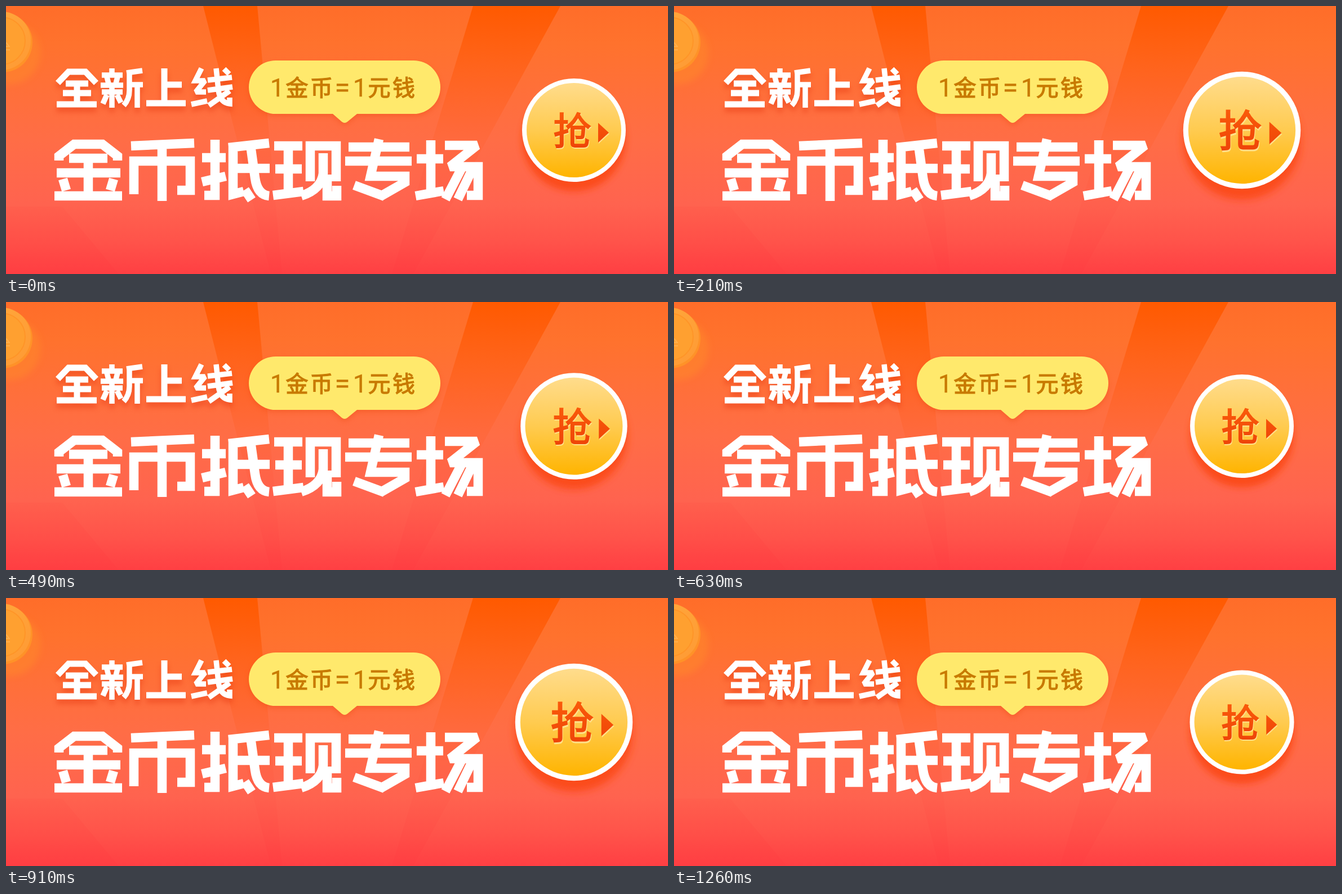
An HTML page that plays this animation: 1175x477 px, repeating every 1.33 s.

```html
<!DOCTYPE html>
<html lang="zh">
<head>
<meta charset="utf-8">
<title>金币抵现专场</title>
<style>
  html, body { margin: 0; width: 100%; height: 100%; overflow: hidden; background: #ff6a40; }
  svg { display: block; width: 100vw; height: 100vh; }
  text { font-family: "Noto Sans CJK SC", "Noto Sans CJK", "Noto Sans CJK JP", sans-serif; }
  .lettering { fill: none; stroke: #fff; stroke-linejoin: miter; stroke-miterlimit: 2; }
  .small { stroke-width: 11; filter: drop-shadow(0 8px 5px rgba(226, 48, 12, .42)); }
  .thin { stroke-width: 9.5; }
  .big { stroke-width: 16.5; }
  .bubble { fill: #ffe96c; filter: drop-shadow(0 4px 4px rgba(236, 70, 10, .35)); }
  .rate { fill: #c87a00; stroke: #c87a00; stroke-width: 1.3; font-size: 40px; }
  .rate .digit { font-family: Roboto, sans-serif; font-size: 44px; font-weight: 400; stroke-width: .4; }
  .label { stroke-width: 2; font-size: 67px; }
  .label path { stroke: none; }
</style>
</head>
<body>
<svg viewBox="0 0 1175 477">
  <defs>
    <linearGradient id="sky" x2="0" y2="1">
      <stop offset="0" stop-color="#ff6d29"/>
      <stop offset=".14" stop-color="#ff722d"/>
      <stop offset=".5" stop-color="#ff6d46"/>
      <stop offset=".74" stop-color="#ff634f"/>
      <stop offset=".88" stop-color="#ff534a"/>
      <stop offset="1" stop-color="#ff3f43"/>
    </linearGradient>
    <linearGradient id="ray" gradientUnits="userSpaceOnUse" x2="0" y2="477">
      <stop offset="0" stop-color="#ff5a00"/>
      <stop offset=".22" stop-color="#ff5a0c" stop-opacity=".6"/>
      <stop offset=".5" stop-color="#ff5a20" stop-opacity=".2"/>
      <stop offset=".75" stop-color="#ff4a40" stop-opacity=".12"/>
      <stop offset="1" stop-color="#ff3a40" stop-opacity=".3"/>
    </linearGradient>
    <linearGradient id="gold" x2="0" y2="1">
      <stop offset="0" stop-color="#ffdc8c"/>
      <stop offset=".5" stop-color="#ffcb50"/>
      <stop offset="1" stop-color="#ffb400"/>
    </linearGradient>
    <linearGradient id="coin" x2="1" y2="1">
      <stop offset="0" stop-color="#ffa93c"/>
      <stop offset="1" stop-color="#ff9a34"/>
    </linearGradient>
    <linearGradient id="ink" gradientUnits="userSpaceOnUse" y1="-32" x2="0" y2="32">
      <stop offset="0" stop-color="#fa5a0a"/>
      <stop offset="1" stop-color="#ee4408"/>
    </linearGradient>
    <filter id="blur" x="-30%" y="-30%" width="160%" height="160%">
      <feGaussianBlur stdDeviation="6"/>
    </filter>
  </defs>

  <rect width="1175" height="477" fill="url(#sky)"/>
  <g fill="url(#ray)">
    <path d="M350 0H446L490 477H470Z"/>
    <path d="M829 0H984L723 477H685Z"/>
    <path d="M100 357L200 477H0V357Z"/>
  </g>

  <circle cx="6" cy="84" r="55" fill="#ff8a2c" opacity=".5" filter="url(#blur)"/>
  <circle cx="-6" cy="65" r="53" fill="#ff9228"/>
  <circle cx="-8" cy="62" r="52" fill="url(#coin)"/>
  <circle cx="-8" cy="62" r="42" fill="#ffa030" stroke="#ff9528" stroke-width="2"/>
  <path d="M0 65L5 71M0 72H7M0 78H7" fill="none" stroke="#ffb04c" stroke-width="2"/>

  <g class="lettering small" role="img" aria-label="全新上线">
    <path d="M92 137L111 117H141L160 137M106 138H146M101 155H151M90 175H161M126 138V175"/>
    <path class="thin" d="M188 111V122M170 123H207M179 126L182 138M198 126L195 138M168 141H208M170 153H207M188 141V181M179 158L172 174M197 158L204 172M242 115L214 119M219 117V150Q219 166 209 177M219 140H243M233 140V181"/>
    <path d="M281 111V174M281 140H312M249 173H319"/>
    <path class="thin" d="M347 111L336 133H353L337 153H355M329 175L357 169M358 132L401 127M358 150L402 144M373 111L377 150Q380 172 397 174V163M397 151L360 177M387 112L396 121"/>
  </g>

  <g class="lettering big" role="img" aria-label="金币抵现专场">
    <path d="M94 275V267L121 246H171L198 267V275M112 271H180M90 297H203M86 338H206M146 271V338M101 308L107 328M191 308L185 328"/>
    <path d="M222 249L334 244M227 335V276H327V328H304M277 247V347"/>
    <path d="M348 270H390M371 238V337H352M348 313L390 303M395 252L467 244M403 250V335L422 330M403 289H468M434 248L442 306Q446 336 467 338M424 327L436 345"/>
    <path d="M476 249H526M478 290H525M474 337L528 330M501 249V334M540 312V249H586V312M563 262V298Q560 326 524 338M570 300V338H587V320"/>
    <path d="M608 251H716M602 276H720M662 237L647 303H708V314L666 338M618 319L672 339"/>
    <path d="M729 272H776M754 239V332M727 338L777 329M779 248H836L788 286H838V337H818M808 290L780 344M828 290L802 344"/>
  </g>

  <path class="bubble" d="M478.500 97H723.500A47.500 47.500 0 0 1 723.500 192H623L606 206Q601 210 596 206L580 192H478.500A47.500 47.500 0 0 1 478.500 97Z"/>
  <g class="rate">
    <text class="digit" x="469 616" y="161">11</text>
    <text x="496.500 540 586 642.500 686" y="160">金币=元钱</text>
  </g>

  <g id="button" transform="translate(1008 221)">
    <circle cy="17" r="92" fill="#fb4a18" opacity=".9" filter="url(#blur)"/>
    <circle r="92" fill="#fff"/>
    <circle r="84" fill="url(#gold)"/>
    <g class="label">
      <g fill="#ffe08a" stroke="#ffe08a" transform="translate(1 2)">
        <text x="-36.500" y="26">抢</text>
        <path d="M43 -13L62 4.500L43 22Z"/>
      </g>
      <g fill="url(#ink)" stroke="url(#ink)">
        <text x="-36.500" y="26">抢</text>
        <path d="M43 -13L62 4.500L43 22Z"/>
      </g>
    </g>
  </g>
</svg>
<script>
  const STEP = 70, STEPS = 19, PULSE = 10, PEAK = 5, END = 9, GROW = 0.15;
  const button = document.getElementById('button');

  const bezier = (a, b, u) => 3 * a * u * (1 - u) ** 2 + 3 * b * u * u * (1 - u) + u ** 3;

  // The CSS "ease" curve, solved by bisection.
  function ease(x) {
    let lo = 0, hi = 1;
    for (let i = 0; i < 24; i++) {
      const mid = (lo + hi) / 2;
      if (bezier(0.25, 0.25, mid) < x) lo = mid; else hi = mid;
    }
    return bezier(0.1, 1, lo);
  }

  function pulse(k) {
    if (k >= END) return 0;
    return k <= PEAK ? ease(k / PEAK) : 1 - ease((k - PEAK) / (END - PEAK));
  }

  // Two beats per loop, held in steps of 70 ms.
  function draw(now) {
    const k = Math.floor(now / STEP) % STEPS % PULSE;
    const scale = 1 + GROW * pulse(k);
    button.setAttribute('transform', `translate(1008 221) scale(${scale.toFixed(4)})`);
  }

  const start = performance.now();
  function tick() {
    draw(performance.now() - start);
    requestAnimationFrame(tick);
  }
  tick();
</script>
</body>
</html>
```
